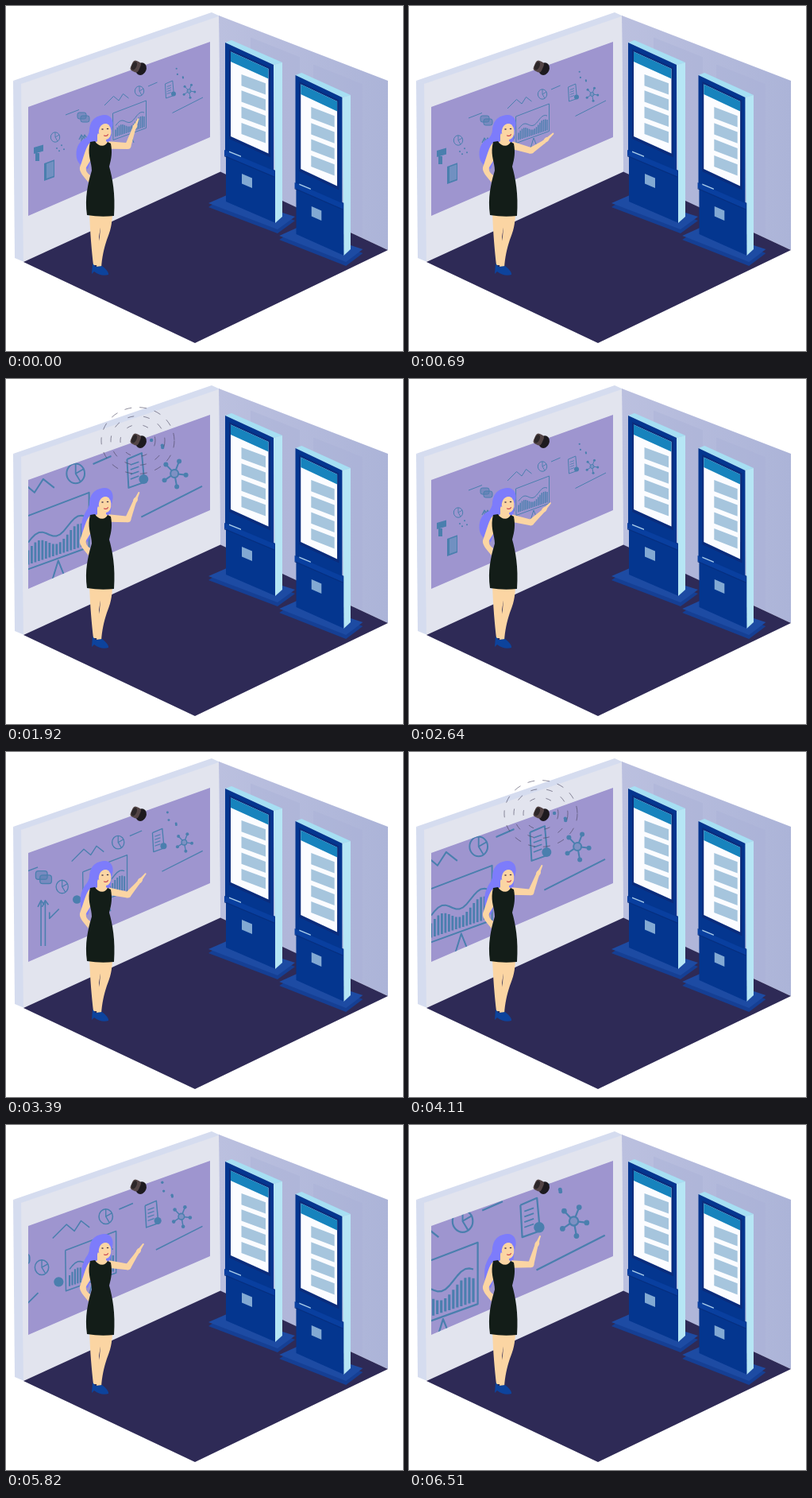
These frames come from a looping animation (500 px wide and 434 px high, 6.54 s). An HTML page with a canvas:

```html
<!DOCTYPE html>
<html lang="en">
<head>
<meta charset="utf-8">
<title>Interactive showroom</title>
<style>
html, body { margin: 0; width: 100%; height: 100%; overflow: hidden; background: #fff; }
canvas { display: block; width: 500px; height: 434px; }
</style>
</head>
<body>
<canvas id="stage"></canvas>
<script>
const W = 500, H = 434, LOOP = 6540, CYCLE = 2190, STEP = 30, TAU = Math.PI * 2;
const INK = '#4a7fae', SKIN = '#fbd5a3', HAIR = '#7d7cfb', NAVY = '#04368f';
const cv = document.getElementById('stage');
const dpr = window.devicePixelRatio || 1;
cv.width = W * dpr;
cv.height = H * dpr;
const c = cv.getContext('2d');

const clamp = v => Math.max(0, Math.min(1, v));
const mix = (a, b, k) => a + (b - a) * k;
const smooth = v => { v = clamp(v); return v * v * (3 - 2 * v); };

function trace(p, close) {
  c.beginPath();
  for (let i = 0; i < p.length; i += 2) c.lineTo(p[i], p[i + 1]);
  if (close) c.closePath();
}
function poly(color, ...p) {
  trace(p, true);
  c.fillStyle = color;
  c.fill();
}
// Upright parallelogram whose top and bottom fall by k per pixel
function slab(color, x, y, w, h, k) {
  poly(color, x, y, x + w, y + w * k, x + w, y + w * k + h, x, y + h);
}
function ink(w, ...p) {
  trace(p, false);
  c.strokeStyle = INK;
  c.lineWidth = w;
  c.stroke();
}
function disc(color, x, y, rx, ry = rx, turn = 0) {
  c.beginPath();
  c.ellipse(x, y, rx, ry, turn, 0, TAU);
  c.fillStyle = color;
  c.fill();
}
function ring(color, w, x, y, rx, ry = rx) {
  c.beginPath();
  c.ellipse(x, y, rx, ry, 0, 0, TAU);
  c.strokeStyle = color;
  c.lineWidth = w;
  c.stroke();
}
function shape(color, d) {
  c.fillStyle = color;
  c.fill(new Path2D(d));
}

function room() {
  poly('#d5dcef', 9, 94, 259, 8, 270, 13, 20, 99);
  poly('#d5dcef', 9, 94, 20, 98, 23, 322, 11, 317);
  poly('#e2e4ee', 19, 98, 268, 13, 270, 209, 22, 322);
  const shade = c.createLinearGradient(268, 0, 481, 0);
  shade.addColorStop(0, '#bbc0df');
  shade.addColorStop(1, '#acb4d8');
  poly(shade, 268, 12, 481, 94, 481, 307, 270, 209);
  for (const x of [308, 387]) slab('rgba(168,174,212,.4)', x, x * .43 - 93, 62, 192, .4);
  poly('#2e2a56', 22, 322, 270, 208.5, 481, 307, 238, 424);
}

function pie(x, y) {
  ring(INK, 1, x, y, 5.7, 6.2);
  ink(.9, x, y - 6, x, y, x + 5.2, y - 3);
  ink(.9, x, y, x + 3, y + 5);
}

function chart() {
  ink(1, 134.5, 139, 176.5, 123, 176.5, 157.5, 135, 172.5, 134.5, 139);
  const top = u => 154.5 - 15 * u - 3.5 * Math.sin(u * 9);
  const curve = [];
  for (let u = 0; u <= 1; u += 1 / 16) {
    const x = mix(138, 174, u);
    curve.push(x, top(u));
    ink(1.4, x, 168.5 - 12 * u, x, top(u) + 5);
  }
  ink(1, ...curve);
  ink(1, 153, 179, 157, 166, 161, 176);
}

function leftIcons() {
  ink(1, 75, 141, 92, 134.5);
  for (const d of [0, 4]) {
    c.beginPath();
    c.roundRect(90 + d, 138 + d, 11, 8, 2.5);
    c.fillStyle = 'rgba(86,128,178,.5)';
    c.fill();
    c.strokeStyle = INK;
    c.stroke();
  }
  pie(62, 169);
  pie(115, 153);
  disc(INK, 129, 165, 4);
  slab(INK, 35, 182, 12, 8, -.3);
  slab(INK, 37, 189, 5, 10, 0);
  slab(INK, 48, 202, 13, 22, -.36);
  slab('#7190c1', 51, 202.5, 9, 18.5, -.36);
  for (let i = 0; i < 4; i++) disc(INK, 64 + i * 3, 183 + 4 * Math.sin(i * 2.2), 1);
  for (const x of [95, 99]) {
    ink(1.2, x, 209, x, 167);
    ink(1.2, x - 3, 172, x, 166, x + 3, 170);
  }
  ink(1.2, 103, 177, 103, 183, 112, 174);
}

function network(x, y) {
  for (let i = 0; i < 5; i++) {
    const a = -1.15 + i * TAU / 5;
    const nx = x + 7.3 * Math.cos(a), ny = y + 8.5 * Math.sin(a);
    ink(1, x, y, nx, ny);
    disc(INK, nx, ny, 1.5);
  }
  disc('#7e90c3', x, y, 2.5);
  ring(INK, 1, x, y, 2.5);
}

function rightIcons() {
  ink(1, 124, 129, 135.5, 117.5, 142, 123, 147.5, 114.5, 154.5, 120);
  pie(168, 111);
  ink(1, 179, 105, 190.5, 100);
  ink(1, 200.5, 102, 209.8, 98, 211.5, 116.5, 201.5, 120, 200.5, 102);
  for (let y = 105.5; y < 117; y += 3) ink(.8, 202.7, y, 208, y - 1.9);
  disc(INK, 211, 114.5, 3);
  network(230.5, 111);
  for (let i = 0; i < 4; i++) disc(INK, 218 + 5 * Math.cos(i * 2), 89 + 6.5 * Math.sin(i * 2 + 1), 1.1);
  ink(1, 209.5, 138.5, 248, 119);
}

function wallScreen(zoom, lift) {
  c.save();
  trace([28, 127, 257, 45, 257, 165, 28, 264], true);
  c.fillStyle = '#9e95cf';
  c.fill();
  c.clip();
  c.translate(249, 103 - lift);
  c.scale(zoom, zoom);
  c.translate(-249, -103);
  leftIcons();
  chart();
  rightIcons();
  c.restore();
}

function kiosk(x, y, sx) {
  c.save();
  c.translate(x, y);
  c.scale(sx, 1);
  c.translate(-276, -46);
  for (const d of [5, 0]) poly(d ? '#153f94' : '#1d4ba3', 255, 248 + d, 278, 238, 364, 265 + d, 342, 281 + d);
  poly('#a6dff3', 276, 46, 284, 43, 348, 71, 337, 74);
  poly('#b6e6f5', 337, 74, 348, 71, 348, 265, 339, 273);
  slab(NAVY, 276, 46, 61, 137, .459);
  slab(NAVY, 277, 180, 62, 66, .43);
  slab('#0a2c7c', 281, 54, 52, 113, .45);
  slab('#fbfcff', 283, 57.5, 47.5, 106.5, .45);
  slab('#1783bd', 283, 57.5, 47.5, 12.5, .45);
  for (let i = 0; i < 4; i++) slab('#a6c5dd', 296.5, 86 + i * 20.3, 30.5, 14.2, .37);
  slab('#093f9f', 275, 181, 63, 7, .42);
  slab('#062f80', 275, 188, 63, 1.2, .42);
  slab('#a9cdea', 281, 182.5, 15, 1.6, .4);
  slab('#82a9d3', 297, 211, 13, 12.5, .42);
  c.restore();
}

function camera() {
  c.save();
  c.translate(166.5, 77.5);
  c.rotate(.42);
  disc('#1d1a1f', 4, 0, 6.5, 8);
  c.fillStyle = '#544546';
  c.beginPath();
  c.roundRect(-9, -7, 11, 14, 4);
  c.fill();
  disc('#2d2729', -5.5, 0, 3, 5.6);
  c.restore();
}

// Dashed signal rings, two bursts per cycle
function signal(t) {
  for (const [start, end] of [[710, 1140], [1440, 2050]]) {
    if (t < start || t > end) continue;
    const grow = mix(.3, 1, smooth((t - start) / 330));
    c.save();
    c.globalAlpha = .75 * clamp((t - start) / 120) * clamp((end - t) / 90);
    c.translate(166, 77.5);
    for (let i = 0; i < 3; i++) {
      const r = (46 - i * 12) * grow;
      c.setLineDash([9 - i, 10 + i * 2]);
      ring('#45425c', .8, 0, 0, r, r * .91);
    }
    c.restore();
  }
}

function limb(x0, y0, w0, x1, y1, w1) {
  const a = Math.atan2(y1 - y0, x1 - x0), s = Math.sin(a), k = Math.cos(a);
  poly(SKIN, x0 - s * w0, y0 + k * w0, x1 - s * w1, y1 + k * w1,
    x1 + s * w1, y1 - k * w1, x0 + s * w0, y0 - k * w0);
  disc(SKIN, x1, y1, w1);
}

function arm(q) {
  const ex = 153.5, ey = mix(182, 175.5, q);
  const wx = mix(170, 160, q), wy = mix(171, 153, q);
  const tx = mix(181.5, 165, q), ty = mix(160.5, 140, q);
  limb(129, 175, 4.7, ex, ey, 3.8);
  limb(ex, ey, 3.8, wx, wy, 2.2);
  const hx = mix(wx, tx, .25), hy = mix(wy, ty, .25);
  disc(SKIN, hx, hy, 3.8, 2.7, Math.atan2(ty - wy, tx - wx));
  limb(hx, hy, 1.9, tx, ty, .9);
}

function woman(q, sway) {
  const b = mix(88.5, 95, sway);
  shape(HAIR, `M119 138 C130 134 137 143 134 153 L131 172 L108 178 C107 188 107 197 103 205 ` +
    `C97 203 ${b} 198 ${b} 187 C${b} 176 ${b + 4} 170 101 166 C107 160 105 144 119 138Z`);
  // legs and shoes
  shape(SKIN, 'M118 258 L134 258 C134 275 131 284 127 294 C123 306 121 316 120 329 L114 329 ' +
    'C115 312 116 300 118 290 C119 280 119 270 118 258Z');
  shape(SKIN, 'M105 258 L121 258 C121 272 118 282 117 292 C117 306 117 316 116 326 L110 326 ' +
    'C108 308 106 288 105 258Z');
  shape('#0d439c', 'M109 324 L113 328 L121 327 C125 330 130 335 129 338 C123 340 116 338 111 334 L108 337Z');
  // resting arm
  shape(SKIN, 'M106 172 C101 175 98 190 93 203 C92 208 97 214 104 222 L106 213 C102 210 100 207 101 203 ' +
    'L109 190Z');
  arm(q);
  shape(SKIN, 'M115 160 L126 164 L126 170 L132 174 L120 184 L106 176 L115 170Z');
  shape('#131d18', 'M106 171 L112 170 C116 177 125 178 128 171 L132 173 C134 184 133 191 130 202 ' +
    'C134 216 138 236 136 264 Q119 266 102 263 C99 241 103 224 108 207 C108 197 103 189 105 176Z');
  // head
  disc(SKIN, 124.5, 157.5, 7.9, 10.8, -.12);
  shape(HAIR, 'M105 160 C104 142 116 136 125 138 C131 139 134 145 133 152 C128 146 121 147 118 153 ' +
    'C116 159 115 165 111 170Z');
  disc('#3c2c44', 121.5, 155, 1.3, .7);
  disc('#3c2c44', 128, 154.5, 1.3, .7);
  c.beginPath();
  c.arc(125.5, 160, 3.4, .4, 2.3);
  c.strokeStyle = '#c9444f';
  c.lineWidth = 1.1;
  c.stroke();
}

function draw(time) {
  const t = Math.floor((time % LOOP) / STEP) * STEP % CYCLE;
  const p = clamp((t - 690) / 1440);
  const settle = 1 - smooth(t / 660);
  c.setTransform(dpr, 0, 0, dpr, 0, 0);
  c.fillStyle = '#fff';
  c.fillRect(0, 0, W, H);
  c.lineJoin = 'round';
  room();
  wallScreen(Math.pow(2.24, p), 4 * settle);
  signal(t);
  camera();
  kiosk(276, 46, 1);
  kiosk(364.5, 87, .965);
  woman(t < 690 ? .9 * settle : p, smooth(p * 2));
}

const began = performance.now();
function tick() {
  draw(performance.now() - began);
  requestAnimationFrame(tick);
}
tick();
</script>
</body>
</html>
```
